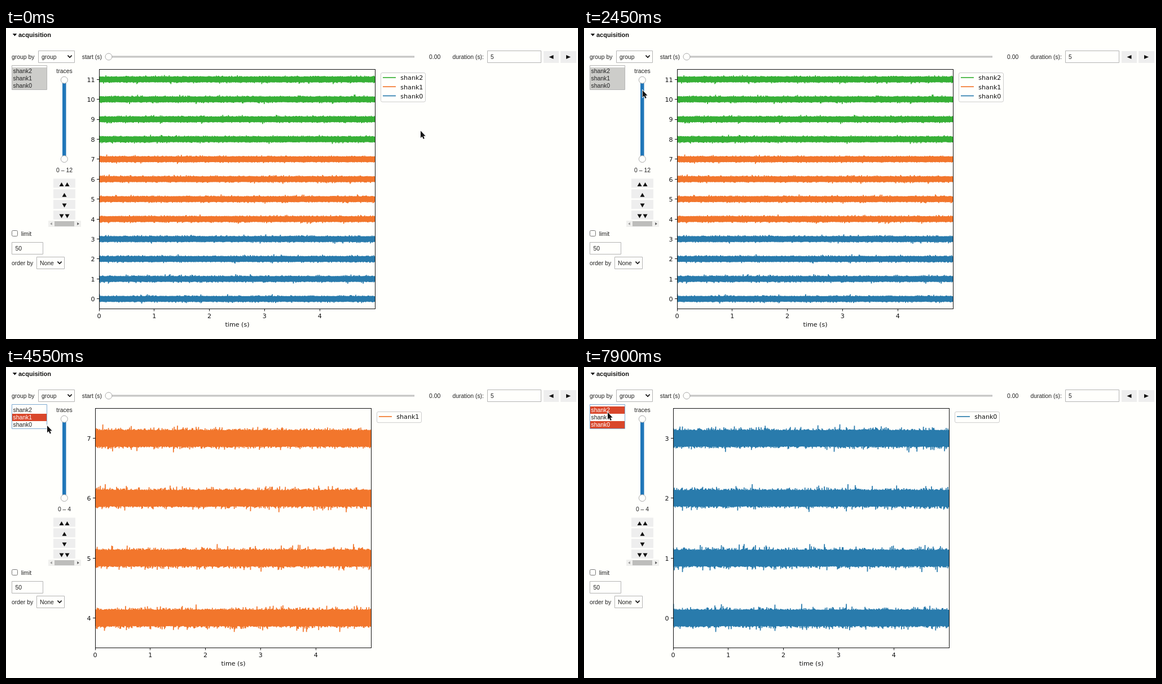
An HTML page with a canvas that plays this animation: 1014 px wide and 552 px high, repeating every 8 s.

```html
<!DOCTYPE html>
<html lang="en">
<head>
<meta charset="utf-8">
<title>Trace viewer</title>
<style>
  html, body { margin: 0; width: 100%; height: 100%; overflow: hidden; background: #fffffc; }
  canvas { display: block; }
</style>
</head>
<body>
<canvas id="stage" width="1014" height="552"></canvas>
<script>
const ctx = document.getElementById('stage').getContext('2d');
const LOOP = 8000, PLOT_WIDTH = 489, SAMPLES = 340;
const UI = '10.4px "Liberation Sans", Arial, sans-serif';
const UI_BOLD = 'bold 11px "Liberation Sans", Arial, sans-serif';
const PLOT = '11.1px "DejaVu Sans", sans-serif';
const INK = '#222', PAPER = '#fffffc', RED = '#d9472b';
const COLORS = ['#297bac', '#f2762c', '#37b036'];

// Seeded noise: extent above and below each trace, in trace units
let seed = 7;
const random = () => (seed = seed * 16807 % 2147483647) / 2147483647;
const extent = () => 0.135 + Math.min(0.1, -0.016 * Math.log(random()));
const traces = Array.from({ length: 12 }, () =>
  Array.from({ length: SAMPLES }, () => [extent(), extent()]));

// Cursor moves: start, duration, destination
const STEP = 100;
const home = [735, 182.5];
const moves = [
  [450, 900, 307, 118], [1350, 300, 262, 308], [1650, 200, 215, 268.5],
  [1850, 200, 140, 106], [2050, 200, 253, 172], [2250, 400, 54, 90],
  [3950, 300, 108, 107], [4400, 100, 105, 209], [4500, 100, 73, 104],
  [4800, 200, 46, 98], [5100, 600, 44, 102.5], [6800, 200, 39, 100],
  [7200, 300, 58, 90], [7500, 300, 42, 80.5]
];

function cursorAt(t) {
  let [x, y] = home;
  for (const [start, duration, toX, toY] of moves) {
    if (t < start) break;
    const elapsed = (Math.floor((t - start) / STEP) + 1) * STEP;
    const k = Math.min(1, elapsed / duration);
    x += (toX - x) * k;
    y += (toY - y) * k;
  }
  return [x, y];
}

function text(s, x, y, font = UI, align = 'left', color = INK) {
  ctx.font = font;
  ctx.textAlign = align;
  ctx.fillStyle = color;
  ctx.fillText(s, x, y + (font === PLOT ? 4.1 : 3.7));
}
function rect(x, y, w, h, fill) {
  ctx.fillStyle = fill;
  ctx.fillRect(x, y, w, h);
}
function box(x, y, w, h, stroke = '#b4b4b4', radius = 0) {
  ctx.beginPath();
  ctx.roundRect(x + .5, y + .5, w - 1, h - 1, radius);
  ctx.fillStyle = PAPER;
  ctx.fill();
  ctx.strokeStyle = stroke;
  ctx.lineWidth = 1;
  ctx.stroke();
}
function line(color, width, ...points) {
  ctx.beginPath();
  points.forEach(p => ctx.lineTo(...p));
  ctx.strokeStyle = color;
  ctx.lineWidth = width;
  ctx.stroke();
}
function knob(x, y) {
  ctx.beginPath();
  ctx.arc(x, y, 6, 0, 7);
  ctx.fillStyle = PAPER;
  ctx.fill();
  ctx.strokeStyle = '#aaa';
  ctx.lineWidth = 1;
  ctx.stroke();
}
// Triangle pointing up, turned by quarter turns clockwise
function triangle(x, y, turns, w = 8, h = 7, color = '#111') {
  ctx.save();
  ctx.translate(x, y);
  ctx.rotate(turns * Math.PI / 2);
  ctx.beginPath();
  ctx.moveTo(-w / 2, h / 2);
  ctx.lineTo(w / 2, h / 2);
  ctx.lineTo(0, -h / 2);
  ctx.fillStyle = color;
  ctx.fill();
  ctx.restore();
}
function dropdown(x, y, w, label) {
  box(x, y, w, 22);
  text(label, x + 6, y + 11);
  const cx = x + w - 9, cy = y + 10.5;
  line('#111', 1.7, [cx - 3.6, cy - 1.8], [cx, cy + 1.8], [cx + 3.6, cy - 1.8]);
}

function drawControls(selected, focused, range) {
  triangle(15.5, 12.3, 2, 7.5, 4.5);
  text('acquisition', 22, 12, UI_BOLD, 'left', '#111');
  text('group by', 10, 51);
  dropdown(57, 40, 65, 'group');

  text('start (s)', 134.7, 51);
  rect(182, 49.5, 542, 3, '#bcbcbc');
  rect(183, 50.5, 540, 1, '#d2d2d0');
  knob(182, 51);
  text('0.00', 750, 51);
  text('duration (s):', 791.5, 51);
  box(853, 40, 96, 22);
  text('5', 859, 51);
  rect(953, 41, 27, 21, '#eee');
  rect(983, 41, 28, 21, '#eee');
  triangle(966.5, 51.5, 3, 7, 8);
  triangle(997, 51.5, 1, 7, 8);

  box(10, 66, 63, 44, focused ? '#7eaad2' : '#b4b4b4');
  for (let n = 0; n < 3; n++) {
    const on = selected.includes(n), y = 96 - n * 13;
    if (on) rect(11, y, 61, 13, focused ? RED : '#cdcdca');
    text('shank' + n, 12.5, y + 6.4, UI, 'left', on && focused ? '#fff' : INK);
  }

  text('traces', 103.5, 76.3, UI, 'center');
  rect(100, 92, 6.5, 140, '#2077b9');
  knob(103.3, 92.3);
  knob(103.3, 232.5);
  text('0 – ' + range, 103.5, 252.5, UI, 'center');
  for (let i = 0; i < 4; i++) {
    const y = 267.5 + i * 18.8;
    rect(84, y, 39, 16, '#eee');
    const offsets = i % 3 ? [0] : [-5, 5];
    offsets.forEach(dx => triangle(103.5 + dx, y + 10, i < 2 ? 0 : 2));
  }
  rect(75, 342, 58, 11, '#f0f0ee');
  rect(86, 343, 35, 9, '#bdbdbb');
  triangle(80, 347.5, 3, 5, 3.5, '#999');
  triangle(128, 347.5, 1, 5, 3.5, '#555');

  box(10, 359, 11, 11, '#777', 2);
  text('limit', 26.7, 365.5);
  box(10, 380, 56, 22);
  text('50', 16.5, 391);
  text('order by', 10, 417);
  dropdown(54, 406, 50, 'None');
}

// Plots the given shanks (top one first), four traces each
function drawPlot(shanks) {
  const left = shanks.length > 1 ? 165 : 158, right = left + PLOT_WIDTH;
  const top = 73.5, bottom = 498.5;
  const rows = shanks.length * 4, spacing = (bottom - top) / rows;
  const snap = v => Math.floor(v) + .5;
  ctx.lineJoin = 'bevel';
  for (let row = 0; row < rows; row++) {
    const shank = shanks[Math.floor(row / 4)];
    const index = shank * 4 + 3 - row % 4;
    const y = top + (row + .5) * spacing;
    const points = traces[index].flatMap(([up, down], i) => {
      const x = left + (i + .5) * PLOT_WIDTH / SAMPLES;
      return [[x, y - up * spacing], [x, y + down * spacing]];
    });
    line(COLORS[shank], 1.67, ...points);
    line('#111', 1, [left - 4, snap(y)], [left, snap(y)]);
    text(index, left - 7.5, y + .3, PLOT, 'right', '#111');
  }
  ctx.lineJoin = 'miter';
  for (let s = 0; s < 5; s++) {
    const x = left + s * PLOT_WIDTH / 5;
    line('#111', 1, [snap(x), bottom], [snap(x), bottom + 4]);
    text(s, x, 511, PLOT, 'center', '#111');
  }
  ctx.strokeStyle = '#111';
  ctx.strokeRect(left + .5, top, PLOT_WIDTH, bottom - top);
  text('time (s)', left + PLOT_WIDTH / 2 + .5, 526.2, PLOT, 'center', '#111');

  box(right + 10, 79, 80, 4 + shanks.length * 16.2, '#ccc', 2.5);
  shanks.forEach((n, i) => {
    const y = 88 + i * 16.2;
    line(COLORS[n], 1.67, [right + 14, y], [right + 37, y]);
    text('shank' + n, right + 45.3, y + .3, PLOT, 'left', '#111');
  });
}

function drawCursor(x, y) {
  ctx.beginPath();
  [[0, 0], [0, 12.5], [2.8, 10], [4.8, 14.5], [6.9, 13.6], [4.9, 9.3], [8.7, 9.3]]
    .forEach(([dx, dy]) => ctx.lineTo(x + dx, y + dy));
  ctx.closePath();
  ctx.strokeStyle = '#fff';
  ctx.lineWidth = 1.6;
  ctx.stroke();
  ctx.fillStyle = '#151515';
  ctx.fill();
}

let lastKey;
function frame(now) {
  const t = now % LOOP;
  const selected = t < 2900 ? [2, 1, 0] : t < 5450 ? [1] : t < 7900 ? [0] : [2, 0];
  const shown = t < 3350 ? [2, 1, 0] : t < 6150 ? [1] : [0];
  const range = t < 3050 ? 12 : 4;
  const cursor = cursorAt(t);
  const key = JSON.stringify([selected, shown, range, cursor]);
  if (key !== lastKey) {
    lastKey = key;
    rect(0, 0, 1014, 552, PAPER);
    drawControls(selected, t >= 2900, range);
    drawPlot(shown);
    drawCursor(...cursor);
  }
  requestAnimationFrame(frame);
}
frame(0);
</script>
</body>
</html>
```
